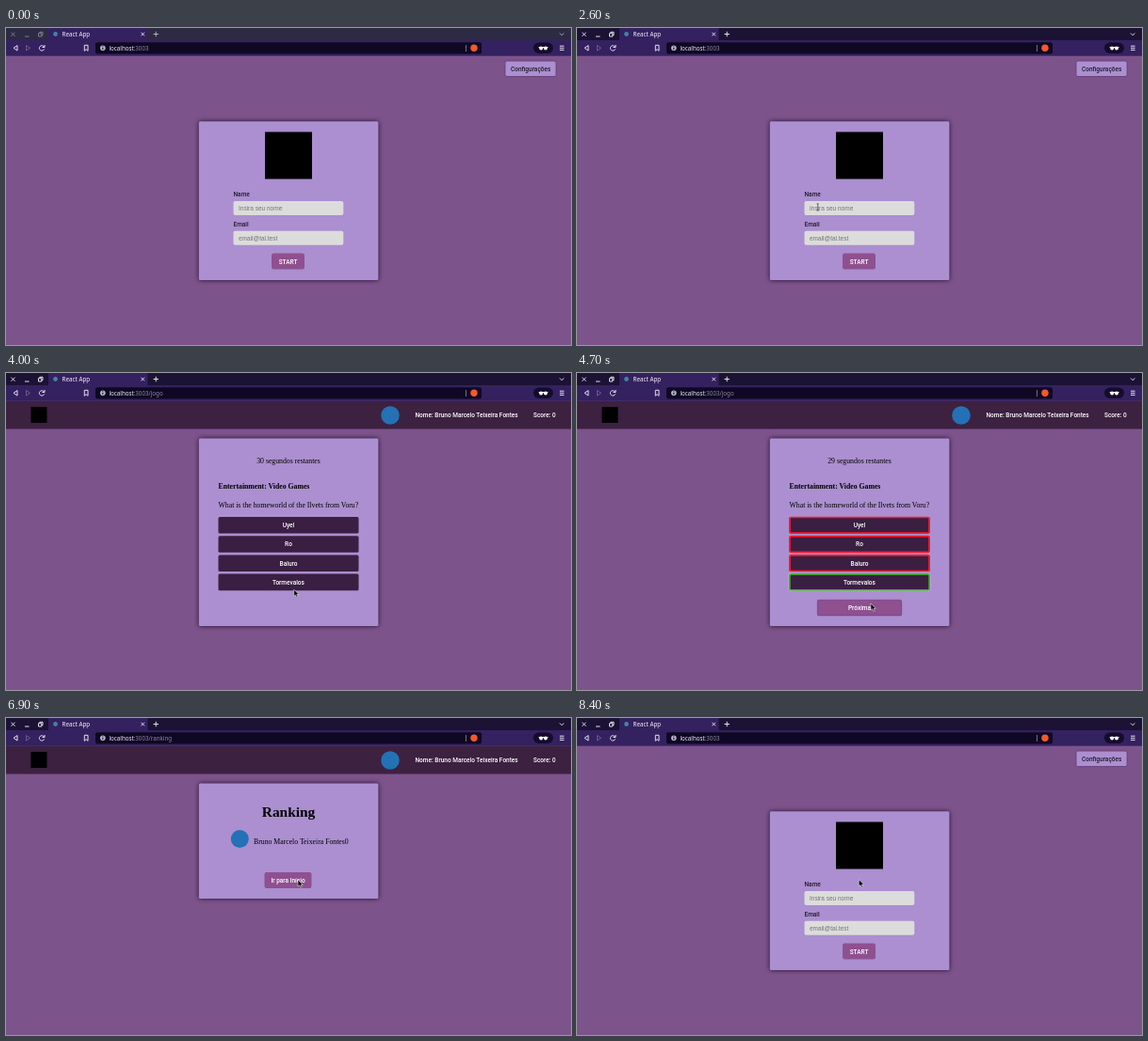
These frames come from a looping animation (600 by 337 pixels, 8.5 s). An HTML page:

```html
<!DOCTYPE html>
<html lang="pt-BR">
<head>
<meta charset="utf-8">
<title>React App</title>
<style>
  html, body { margin: 0; width: 100%; height: 100%; overflow: hidden; background: #7d538c; }
  svg { display: block; width: 100%; height: 100%; }
  text { font: 500 6.5px Roboto, "Open Sans", sans-serif; white-space: pre; }
  .serif { font: 7.75px "Liberation Serif", serif; }
  .bold { font-weight: 700; }
  .title { font: 700 15.4px "Liberation Serif", serif; }
  .field { font: 6.5px "Liberation Sans", sans-serif; }
  .url { font: 6.2px "Noto Sans", sans-serif; }
  .tab { font: 500 6.3px "Noto Sans", sans-serif; }
  .mid { text-anchor: middle; }
  .card { fill: #ab8fd0; filter: drop-shadow(0 0 2.4px #1c0a28); }
  .line { fill: none; stroke: #e4e0ee; stroke-width: 1; }
</style>
</head>
<body>
<svg viewBox="0 0 600 337" id="stage"></svg>
<script>
const LOOP = 8500, STEP = 100;
const PLAYER = "Bruno Marcelo Teixeira Fontes";
const MAIL = "brunnomt@correio.test";

const rect = (x, y, w, h, fill, r = 0, more = "") =>
  `<rect x="${x}" y="${y}" width="${w}" height="${h}" rx="${r}" fill="${fill}" ${more}/>`;
const text = (x, y, str, cls = "", fill = "#241a2b", id = "") =>
  `<text x="${x}" y="${y}" class="${cls}" fill="${fill}" id="${id}">${str}</text>`;
const dot = (x, y, r, fill) => `<circle cx="${x}" cy="${y}" r="${r}" fill="${fill}"/>`;
const line = (d, more = "") => `<path class="line" d="${d}" ${more}/>`;
const group = (id, ...parts) => `<g id="${id}">${parts.join("")}</g>`;
const card = (y, bottom) =>
  `<rect class="card" x="204.8" y="${y}" width="190.6" height="${bottom - y}" rx="1.5"/>`;
const button = (x, y, w, h, label) =>
  rect(x, y, w, h, "#8f5090", 2.2) + text(x + w / 2, y + h / 2 + 2.6, label, "mid", "#fff");
const field = (y, label, id) =>
  text(241.5, y - 4.7, label) +
  rect(241.5, y, 116.8, 15, "#dcdcdc", 2, `id="${id}Box"`) +
  text(247, y + 9.8, "", "field", "#757575", id);

const answers = ["Uyel", "Ro", "Baluro", "Tormevalos"];
const answerTop = i => 153 + i * 20.2;
const answer = (label, i) =>
  rect(225.5, answerTop(i), 149, 17.6, "#3a1f42", 1.5) +
  text(300, answerTop(i) + 11.1, label, "mid", "#fff");
const edge = (i, color, width, gap, more = "") =>
  rect(226 - gap, answerTop(i) + .5 - gap, 148 + 2 * gap, 16.6 + 2 * gap, "none", 1.5,
    `stroke="${color}" stroke-width="${width}" ${more}`);
const mark = (_, i) => i < 3
  ? edge(i, "#fb1828", 1.7, 0)
  : edge(i, "#ded6e8", .9, 1, 'stroke-dasharray="1 1"') + edge(i, "#35c50a", 1.3, 0);

const chrome = group("chrome",
  rect(0, 0, 600, 13, "#2d2a43", 0, 'id="bar"'),
  rect(45, 0, 105.5, 14, "#34215f"),
  rect(0, 13, 600, 16.7, "#34215f"),
  group("controls",
    line("M5.5 4.7l4 4m0-4l-4 4"), line("M20 9h4.5"),
    line("M34.5 5.7h3.3v3.3h-3.3zM35.8 5.5v-1.2h3.2v3.3h-1")),
  dot(52.5, 6.5, 2.4, "#42849f"),
  text(59.5, 8.8, "React App", "tab", "#f2eff8"),
  line("M143.5 4.8l3.5 3.5m0-3.5l-3.5 3.5"),
  group("tools", line("M156.5 6.5h5.4m-2.7-2.7v5.4"), line("M588 5.5l2.2 2.2l2.2-2.2")),
  line("M12 18.6v5.4l-4-2.7z"),
  line("M21.5 18.6v5.4l4-2.7z", 'opacity=".3"'),
  line("M40.4 20a2.7 2.7 0 1 0 .2 2.4M41 18v2.5h-2.5"),
  line("M83.3 18.3h3.7v6l-1.85-1.6l-1.85 1.6z"),
  rect(95, 15.2, 410, 12.2, "#0f0825", 2),
  dot(102.8, 21.3, 2.8, "#b8b4c2"), rect(102.3, 20.8, 1, 2.2, "#0f0825"),
  rect(102.3, 19.3, 1, .9, "#0f0825"),
  `<text x="109.5" y="23.5" class="url" fill="#f2eff8">localhost<tspan fill="#8d889c" id="path"></tspan></text>`,
  rect(488.2, 18, .8, 7, "#8d889c"),
  dot(497, 21.2, 3.7, "#f4592b"),
  rect(560, 15.5, 21, 11.5, "#150b2c", 5.7),
  dot(568.2, 21.6, 2, "#fff"), dot(573, 21.6, 2, "#fff"), rect(565.7, 20, 9.8, 1, "#fff"),
  line("M588 19.2h4.6M588 21.3h4.6M588 23.4h4.6"));

const login = group("login",
  rect(530.5, 35.5, 53.2, 15.5, "#ab8fd0", 1.5, 'style="filter:drop-shadow(0 0 1px #54306a)"'),
  text(557.2, 45.8, "Configurações", "mid"),
  card(99.2, 268),
  rect(275, 110.5, 50, 50, "#000"),
  field(183.9, "Name", "name"),
  field(215.8, "Email", "mail"),
  button(282, 239.5, 35, 17, "START"));

const header = group("header",
  rect(0, 29.7, 600, 29.8, "#3c2141"),
  rect(26.5, 36, 17, 17, "#000"),
  dot(408, 45, 9.8, "#2471b5"),
  text(434.5, 47.3, "Nome: " + PLAYER, "", "#fff"),
  text(560, 47.3, "Score: 0", "", "#fff"));

const game = group("game",
  card(69.5, 269),
  text(300, 96, "", "serif mid", "#000", "timer"),
  text(225.5, 123, "Entertainment: Video Games", "serif bold", "#000"),
  text(225.5, 142.5, "What is the homeworld of the Ilvets from Voru?", "serif", "#000"),
  answers.map(answer).join(""),
  group("solved", answers.map(mark).join(""),
    rect(255.3, 241.3, 89.4, 16.6, "#8f5090", 1.5, 'stroke="#6d3a75" stroke-width=".6"'),
    text(300, 252, "Próxima", "mid", "#fff")));

const feedback = group("feedback",
  card(69.5, 204),
  text(300, 96, "Podia ser melhor...", "serif mid", "#000"),
  text(279.8, 120.5, "Assertions: 0", "serif", "#000"),
  text(279.8, 137.5, "Score: 0", "serif", "#000"),
  button(267.5, 153, 64, 16.5, "Jogar Novamente"),
  button(275, 175.5, 49, 16.5, "Ver Ranking"));

const ranking = group("ranking",
  card(69.5, 192),
  text(300, 105, "Ranking", "title mid", "#000"),
  dot(248.3, 128.5, 9.5, "#2471b5"),
  text(263, 134, PLAYER + "0", "serif", "#000"),
  button(274.5, 164, 50, 17, "Ir para Início"));

const pointers =
  `<path id="arrow" d="M0 0v7.2l1.7-1.5l1.2 2.6l1.2-.6l-1.1-2.4h2.3z" fill="#000" stroke="#fff" stroke-width=".5"/>` +
  `<path id="beam" d="M-1.2-3.6h2.4M0-3.6v7.2M-1.2 3.6h2.4" fill="none" stroke="#444" stroke-width=".7"/>`;

document.getElementById("stage").innerHTML =
  rect(0, 0, 600, 337, "#7d538c") + header + login + game + feedback + ranking + chrome + pointers;

const $ = id => document.getElementById(id);
const show = (id, on) => $(id).style.display = on ? "" : "none";

// [start time, page, path]
const pages = [
  [0, "login", ""], [3700, "game", "/jogo"], [5000, "feedback", "/feedback"],
  [6400, "ranking", "/ranking"], [7900, "login", ""]
];
// Pointer way-points: [time, x, y]
const way = [
  [500, 330, 244], [1600, 255.7, 190.5], [2600, 255.7, 190.5], [3200, 298, 249],
  [3700, 298, 249], [4200, 310, 220], [4400, 310, 220], [4700, 312, 245],
  [4900, 312, 245], [5100, 311, 186], [5600, 307.5, 163], [5900, 307.5, 163],
  [6200, 303, 184], [6400, 303, 184], [6800, 310, 172], [7900, 310, 172], [8300, 299.3, 171.8]
];
const last = (list, t) => list.filter(k => k[0] <= t).pop();

function pointer(t) {
  const a = last(way, t), b = way.find(k => k[0] > t) || a;
  const u = b === a ? 0 : (t - a[0]) / (b[0] - a[0]), s = u * u * (3 - 2 * u);
  return [a[1] + (b[1] - a[1]) * s, a[2] + (b[2] - a[2]) * s];
}

function fill(id, value, hint, filled) {
  $(id).textContent = filled ? value : hint;
  $(id).setAttribute("fill", filled ? "#000" : "#757575");
  $(id + "Box").setAttribute("fill", filled ? "#e8f0fe" : "#dcdcdc");
}

function draw(t) {
  const page = last(pages, t)[1], focused = t >= 2400;
  for (const id of ["login", "game", "feedback", "ranking"]) show(id, id === page);
  show("header", page !== "login");
  show("solved", t >= 4400);
  $("timer").textContent = (t < 4200 ? 30 : 29) + " segundos restantes";
  $("path").textContent = ":3003" + last(pages, Math.max(0, t - STEP))[2];
  $("bar").setAttribute("fill", focused ? "#1b1234" : "#2d2a43");
  $("controls").setAttribute("opacity", focused ? 1 : .45);
  $("tools").setAttribute("opacity", focused ? 1 : .7);

  const filled = t >= 2700 && t < 7900;
  fill("name", PLAYER, "Insira seu nome", filled);
  fill("mail", MAIL, "email@tal.test", filled);

  const visible = t >= way[0][0], beam = t >= 1500 && t < 2700;
  show("arrow", visible && !beam);
  show("beam", visible && beam);
  if (visible) {
    const at = `translate(${pointer(t)})`;
    $("arrow").setAttribute("transform", at);
    $("beam").setAttribute("transform", at);
  }
}

function tick() {
  draw(Math.floor(performance.now() % LOOP / STEP) * STEP);
  requestAnimationFrame(tick);
}
tick();
</script>
</body>
</html>
```
